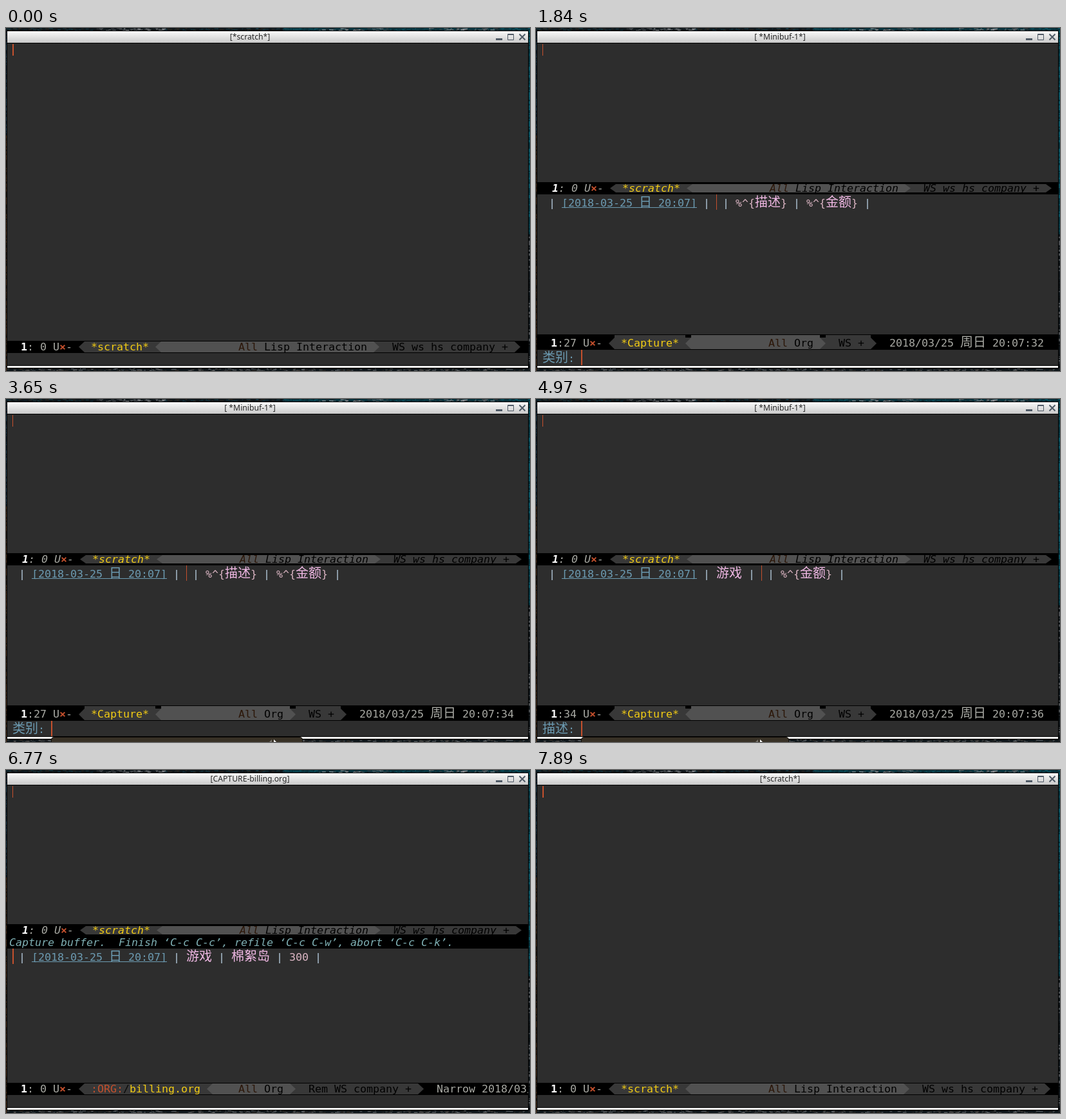
An HTML page that plays this animation: 814x534 px, repeating every 8000 ms.

```html
<!DOCTYPE html>
<html lang="zh">
<head>
<meta charset="utf-8">
<title>Capture</title>
<style>
html, body { margin: 0; width: 814px; height: 534px; overflow: hidden; background: #0d1216; }
svg { display: block; }
text { font: 16.61px "DejaVu Sans Mono", monospace; white-space: pre; }
.cjk { font: 20px "Noto Sans CJK SC", "Noto Sans CJK", sans-serif; }
.title { font: 12.2px "Noto Sans", sans-serif; text-anchor: middle; }
.bold { font-weight: bold; }
.slant { font-style: italic; }
</style>
</head>
<body>
<svg width="814" height="534" viewBox="0 0 814 534">
  <defs>
    <linearGradient id="bar" x2="0" y2="1">
      <stop offset="0" stop-color="#fafafa"/>
      <stop offset="1" stop-color="#c9c9c9"/>
    </linearGradient>
    <clipPath id="win"><rect x="2" y="5" width="809" height="520"/></clipPath>
    <clipPath id="thin"><rect x="2" y="240" width="809" height="17"/></clipPath>
  </defs>
  <g id="wall"></g>
  <g id="frame"></g>
  <g id="screen" clip-path="url(#win)"></g>
  <g id="popup"></g>
</svg>
<script>
const LOOP = 8000, CELL = 10;
const BG = '#2d2d2d', DARK = '#383838', LIGHT = '#515151', RED = '#c5502d';
const GREY = '#a9aaa4', BLUE = '#6c9bb2', YELLOW = '#f2cc14';
const PIPE = '#b3c9da', ROSE = '#dcb6c4', PINK = '#f0b8e4';
const STAMP = '[2018-03-25 日 20:07]';
const GAME = '棉絮岛';
const WROTE = 'Wrote /home/pinecove/Dropbox/org/billing.org';

const forms = [
  { col: 27, row: `| ${STAMP} |  | %^{描述} | %^{金额} |` },
  { col: 34, row: `| ${STAMP} | 游戏 |  | %^{金额} |` },
  { col: 43, row: `| ${STAMP} | 游戏 | ${GAME} |  |` }
];
const menu = [
  'Select a capture template',
  '=========================',
  '',
  '[b]     Billing',
  '-'.repeat(79),
  '[C]     Customize org-capture-templates',
  '[q]     Abort'
];

// Each step changes only the named parts of the state.
const steps = [
  [0, { view: 'scratch', title: '[*scratch*]', echo: '', input: '', popup: 0, clock: 31 }],
  [890, { view: 'select', title: '[*Org Select*]', menu: false }],
  [960, { menu: true }],
  [1030, { echo: 'Select: ' }],
  [1840, { view: 'form', title: '[ *Minibuf-1*]', form: 0, echo: '类别: ', clock: 32 }],
  [2030, { clock: 33 }],
  [2850, { popup: 112 }],
  [3020, { clock: 34 }],
  [3090, { popup: 200 }],
  [3160, { popup: 262 }],
  [3230, { popup: 330 }],
  [3300, { popup: 393 }],
  [3650, { popup: 461 }],
  [3840, { popup: 0 }],
  [3890, { input: '游戏' }],
  [3930, { form: 1, echo: '描述: ', input: '' }],
  [3980, { clock: 35 }],
  [4580, { popup: 112 }],
  [4630, { popup: 300 }],
  [4680, { popup: 400 }],
  [4970, { popup: 393, clock: 36 }],
  [5020, { popup: 410 }],
  [5170, { popup: 427 }],
  [5390, { popup: 461 }],
  [5670, { popup: 0, input: GAME }],
  [5760, { form: 2, echo: '金额: ', input: '' }],
  [5940, { clock: 37 }],
  [6360, { input: '3' }],
  [6460, { input: '30' }],
  [6600, { input: '300' }],
  [6770, { view: 'review', title: '[CAPTURE-billing.org]', echo: '', input: '', lit: false }],
  [6820, { lit: true }],
  [7250, { echo: WROTE }],
  [7290, { view: 'scratch', title: '[*scratch*]' }],
  [7890, { echo: '' }]
];

const isWide = s => /[\u4e00-\u9fff]/.test(s);
const width = s => [...s].reduce((w, c) => w + (isWide(c) ? 2 : 1) * CELL, 0);
const rect = (x, y, w, h, fill) => `<rect x="${x}" y="${y}" width="${w}" height="${h}" fill="${fill}"/>`;
const poly = (points, fill) => `<polygon points="${points}" fill="${fill}"/>`;

function text(x, y, str, fill, cls = '') {
  let out = '';
  for (const run of str.match(/[\u4e00-\u9fff]+|[^\u4e00-\u9fff]+/g) || []) {
    out += `<text x="${x}" y="${y}" fill="${fill}" class="${cls} ${isWide(run) ? 'cjk' : ''}">${run}</text>`;
    x += width(run);
  }
  return out;
}

// Draws coloured pieces one after another.
function pieces(x, y, list, cls) {
  return list.map(([str, fill, extra = '']) => {
    const out = text(x, y, str, fill, `${cls} ${extra}`);
    x += width(str);
    return out;
  }).join('');
}

const clockText = s => `2018/03/25 周日 20:07:${s.clock}`;

// box: y, h = whole line; sy, sh = segments; ay, ah = arrow tips
function modeline(box, { pos, name, mode, minor, tail }) {
  const { y, h, sy, sh, ay = sy, ah = sh, base, dx = 0, cls = '' } = box;
  const mid = ay + ah / 2, end = ay + ah;
  const left = (x, fill) => poly(`${x + 9},${ay} ${x},${mid} ${x + 9},${end}`, fill);
  const right = (x, fill) => poly(`${x},${ay} ${x + 9},${mid} ${x},${end}`, fill);
  const nameEnd = 142 + dx + width(name.map(n => n[0]).join(''));
  const modeEnd = 411 + dx + width(mode);
  const minorX = modeEnd + 29;
  const minorEnd = minorX + width(minor) + 10;
  return rect(2, y, 809, h, '#000') +
    left(113 + dx, DARK) +
    rect(122 + dx, sy, nameEnd - 122 - dx, sh, DARK) +
    rect(nameEnd, ay, 9, ah, DARK) + left(nameEnd, LIGHT) +
    rect(nameEnd + 9, sy, modeEnd - nameEnd - 9, sh, LIGHT) +
    rect(modeEnd, ay, 9, ah, DARK) + right(modeEnd, LIGHT) +
    rect(modeEnd + 9, sy, minorEnd - modeEnd - 9, sh, DARK) +
    right(minorEnd, DARK) +
    pieces(23 + dx, base, [['1', '#fff', 'bold'], [`:${pos} U`, GREY], ['×', RED, 'bold'], ['-', GREY]], cls) +
    pieces(132 + dx, base, name, cls) +
    text(361 + dx, base, 'All', '#2b1608', cls) +
    text(401 + dx, base, mode, '#000', cls) +
    text(minorX, base, minor, '#000', cls) +
    text(minorEnd + 29, base, tail, GREY, cls);
}

const lowLine = { y: 487, h: 19, sy: 488, sh: 17, base: 502 };
const tallLine = { y: 477, h: 24, sy: 478, sh: 22, ay: 482, ah: 18, base: 496 };
const topLine = { y: 240, h: 19, sy: 243, sh: 13, base: 255, dx: 2, cls: 'slant' };

const scratchLine = (box, s) => modeline(box, {
  pos: ' 0', name: [['*scratch*', YELLOW]], mode: 'Lisp Interaction',
  minor: 'WS ws hs company +', tail: clockText(s)
});

function cellColor(part) {
  if (part === '|') return PIPE;
  if (part[0] === '[') return BLUE;
  return isWide(part) ? PINK : ROSE;
}

function tableRow(y, str) {
  const parts = str.match(/\[.*?\]|\||[\u4e00-\u9fff]+|[^|[\u4e00-\u9fff]+/g);
  return pieces(20, y, parts.map(part => [part, cellColor(part)]), '') + rect(40, y + 1, 210, 1, BLUE);
}

const views = {
  scratch: s => rect(10, 25, 2, 18, RED) + scratchLine(lowLine, s) +
    text(10, 521, s.echo, '#e3d6b4'),

  select: s => split(s) +
    (s.menu ? menu.map((line, i) => text(10, 274 + i * 19, line, '#cccccc')).join('') : '') +
    rect(10, 259, 2, 19, RED) +
    modeline(lowLine, {
      pos: ' 0', name: [['*Org Select*', YELLOW]], mode: 'Fundamental', minor: 'WS +', tail: clockText(s)
    }) +
    text(10, 521, s.echo, '#cccccc'),

  form: s => {
    const { col, row } = forms[s.form];
    const inputX = 10 + width(s.echo);
    return split(s) + tableRow(278, row) +
      rect(10 + col * CELL, 259, 1, 24, RED) +
      modeline(tallLine, {
        pos: col, name: [['*Capture*', YELLOW]], mode: 'Org', minor: 'WS +', tail: clockText(s)
      }) +
      text(10, 520, s.echo, BLUE) + text(inputX, 520, s.input, '#cccccc') +
      rect(inputX + width(s.input), 501, 2, 24, RED);
  },

  review: s => split(s) + rect(2, 259, 809, 19, '#000') +
    text(5, 274, 'Capture buffer.  Finish ‘C-c C-c’, refile ‘C-c C-w’, abort ‘C-c C-k’.', '#7fb0b4', 'slant') +
    (s.lit ? rect(10, 278, 480, 24, '#0e0b0e') : '') +
    tableRow(297, `| ${STAMP} | 游戏 | ${GAME} | 300 |`) +
    rect(10, 278, 2, 24, RED) +
    modeline(lowLine, {
      pos: ' 0', name: [[':ORG:', RED], ['/', '#0a0a0a'], ['billing.org', YELLOW]],
      mode: 'Org', minor: 'Rem WS company +', tail: 'Narrow ' + clockText(s)
    }) +
    text(10, 521, s.echo, '#e3d6b4')
};

function split(s) {
  return rect(10, 25, 1, 18, RED) +
    rect(2, 257, 809, 2, '#000') +
    `<g clip-path="url(#thin)">${scratchLine(topLine, s)}</g>`;
}

function popup(right) {
  if (!right) return '';
  const x = right - 52;
  const shell = `<path d="M70.5 534V531Q70.5 526.5 75 526.5H${right - 5}Q${right - .5} 526.5 ${right - .5} 531V534" fill="#383126" stroke="#0c0a08"/>`;
  if (right < 180) return shell;
  return shell +
    poly(`${x + 4},530 ${x},534 ${x + 4},534`, '#77736b') +
    poly(`${x + 7},530 ${x + 11},534 ${x + 7},534`, '#fff');
}

function randomizer(seed) {
  return () => (seed = (seed * 16807) % 2147483647) / 2147483647;
}

function wallpaper() {
  const rnd = randomizer(77);
  const pick = list => list[Math.floor(rnd() * list.length)];
  const rocky = x => [190, 540, 710].some(c => Math.abs(x - c) < 55);
  const stone = ['#5d6266', '#3b3d40', '#9a9ca0', '#1a2024'];
  let out = rect(0, 0, 814, 534, '#0c1418') + rect(430, 0, 384, 4, '#06303a') +
    rect(0, 24, 1, 140, '#142a3c') + rect(0, 164, 1, 370, '#38200f') +
    rect(812, 0, 2, 320, '#07404b');
  for (let i = 0; i < 420; i++) {
    const x = rnd() * 814, y = rnd() * 534;
    const tones = rocky(x) ? stone
      : x > 430 ? ['#075361', '#0a3f4a', '#08242b'] : ['#123640', '#2c251d', '#0c1c24'];
    out += rect(x, rnd() * 4, 1 + rnd() * 6, 1, pick(tones));
    out += rect(rnd() * 814, 530 + rnd() * 4, 1 + rnd() * 6, 1, pick(['#2b2621', '#4b4a48', '#14191d', '#62666a']));
    out += rect(0, y, 1, 1 + rnd() * 3, pick(y < 164 ? ['#1d3c50', '#0c1a26'] : ['#4a2c16', '#1c130c']));
    out += rect(812, y, 2, 1 + rnd() * 3, pick(y < 320 ? ['#0a5361', '#06303a'] : ['#10161a', '#4a4d50', '#0a0e10']));
  }
  return out;
}

const frame = rect(1, 4, 811, 526, '#000') +
  rect(2, 5, 809, 18, 'url(#bar)') +
  rect(2, 24, 809, 501, BG) +
  rect(2, 526, 809, 3, '#f2f2f0') +
  rect(761, 16, 10, 3, '#4f5a66') +
  '<g fill="none" stroke="#4f5a66"><path d="M779.5 9.5h9v9h-9zM779 10.5h10"/>' +
  '<path d="M797.5 9.5l9 9M806.5 9.5l-9 9" stroke-width="2"/></g>';

const el = id => document.getElementById(id);
el('wall').innerHTML = wallpaper();
el('frame').innerHTML = frame;

let state = {};
const states = steps.map(([, change]) => (state = { ...state, ...change }));
const start = performance.now();
let shown = -1;

function tick() {
  const t = (performance.now() - start) % LOOP;
  let i = steps.length - 1;
  while (steps[i][0] > t) i--;
  if (i !== shown) {
    const s = states[i];
    el('screen').innerHTML = `<text x="379" y="18" fill="#262626" class="title">${s.title}</text>` + views[s.view](s);
    el('popup').innerHTML = popup(s.popup);
    shown = i;
  }
  requestAnimationFrame(tick);
}
tick();
</script>
</body>
</html>
```
